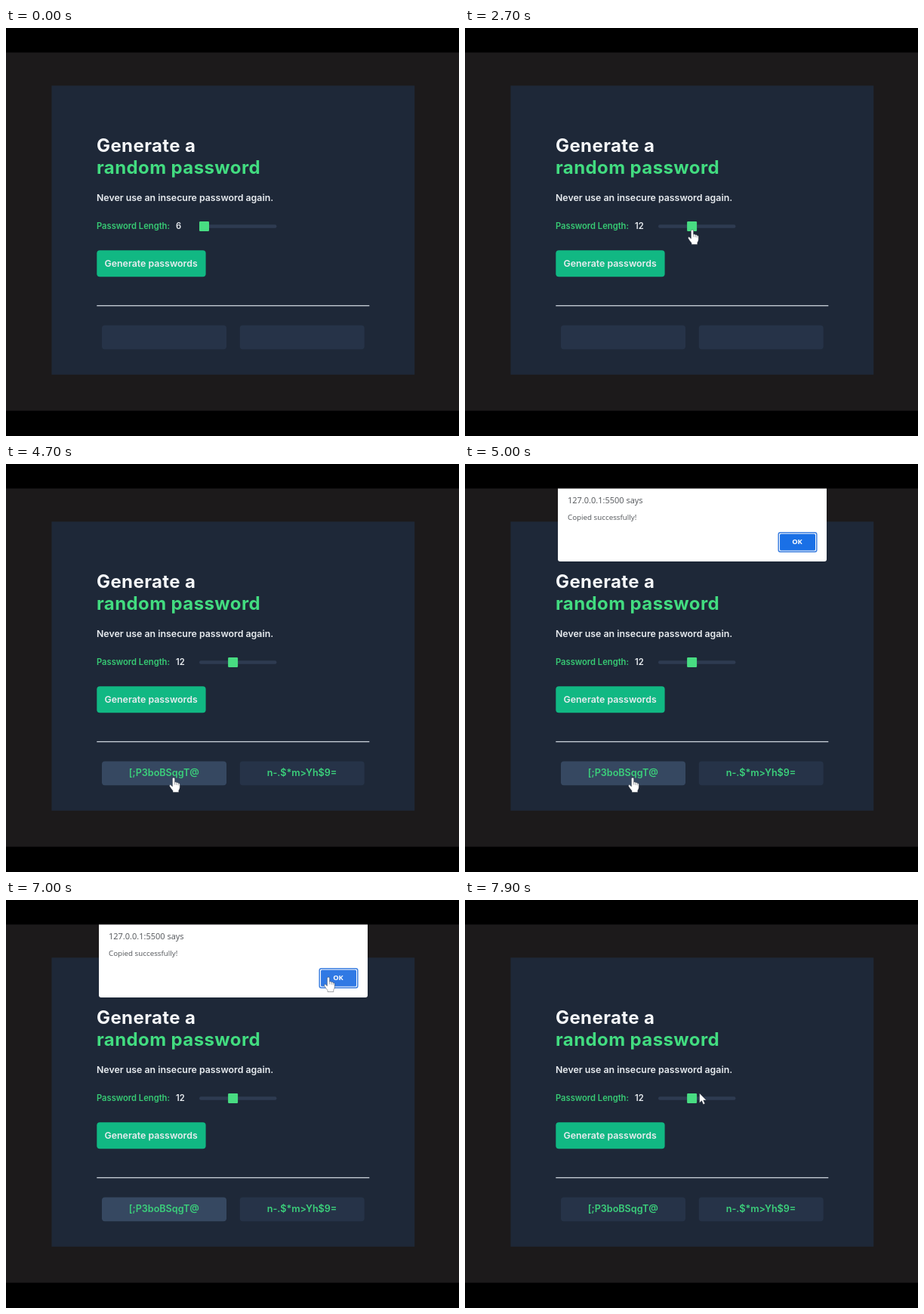
An HTML page for the animation above (8 s loop, 600 px wide and 540 px high).

```html
<!DOCTYPE html>
<html lang="en">
<head>
<meta charset="utf-8">
<title>Password generator</title>
<style>
  html, body { margin: 0; width: 100%; height: 100%; overflow: hidden; background: #000; }
  svg { display: block; width: 600px; height: 540px; font: 600 12.35px Inter, sans-serif; fill: #e8ecf0; }
  .title { font-size: 24px; font-weight: 700; letter-spacing: .4px; fill: #f6f8fa; }
  .small { font-size: 11.2px; }
  .title.accent { fill: #42dc80; }
  .password { font-size: 12.6px; fill: #3bd07b; text-anchor: middle; }
  .box { fill: #263348; }
  .box.hover { fill: #364861; }
  #dialog { font: 11px "Open Sans", sans-serif; fill: #515458; }
  .cursor { fill: #fff; stroke: #17202c; stroke-width: .4; stroke-linejoin: round; }
</style>
</head>
<body>
<svg viewBox="0 0 600 540">
  <rect y="32.4" width="600" height="474.2" fill="#1c1a1b"/>
  <rect x="60.4" y="76.3" width="480.8" height="382.5" fill="#1e2838"/>

  <text class="title" x="120" y="164">Generate a</text>
  <text class="title accent" x="120" y="193">random password</text>
  <text x="120" y="229">Never use an insecure password again.</text>

  <text class="small" x="120" y="266.3" style="fill:#37cb74">Password Length:</text>
  <text class="small" id="length" x="225" y="266.3">6</text>
  <rect x="256" y="260.3" width="102.5" height="4.4" rx="2.2" fill="#2e3b51"/>
  <rect id="thumb" x="256" y="256" width="13" height="13" rx="1.2" fill="#48dc82"/>

  <rect x="120.3" y="294.2" width="144.3" height="35" rx="4" fill="#11b883"/>
  <text x="130.5" y="315.7">Generate passwords</text>

  <rect x="120.3" y="366.9" width="361" height="1.3" fill="#ccd3dc"/>
  <rect id="firstBox" class="box" x="127" y="393.5" width="165" height="31.7" rx="4"/>
  <rect class="box" x="309.7" y="393.5" width="165" height="31.7" rx="4"/>
  <g id="passwords">
    <text class="password" x="209.3" y="413">[;P3boBSqgT@</text>
    <text class="password" x="392" y="413">n-.$*m&gt;Yh$9=</text>
  </g>

  <g id="dialog">
    <path d="M123 32.4H479V126Q479 129 476 129H126Q123 129 123 126Z" fill="#fff"/>
    <text x="136" y="51.5">127.0.0.1:5500 says</text>
    <text x="136" y="73.7" font-size="9.8">Copied successfully!</text>
    <rect x="415.2" y="90.7" width="50.6" height="25.6" rx="2.5" fill="#fff" stroke="#3c7fe0" stroke-width="1.5"/>
    <rect id="ok" x="417" y="92.5" width="47" height="22" rx="1.5"/>
    <text x="440" y="106.4" font-size="9.3" font-weight="700" text-anchor="middle" fill="#fff">OK</text>
  </g>

  <path id="arrow" class="cursor" d="M0 0V12.8L2.9 10L5 14.8L7.2 13.9L5.1 9.2H9Z"/>
  <g id="hand" class="cursor">
    <path d="M-1.6 1.5Q-1.6 0 0 0Q1.6 0 1.6 1.5V6Q3.2 5.2 4 6.8Q5.7 6 6.3 7.6Q8.2 7 8.3 9V13Q8.2 15.3 6.8 17V19.5H-1V17.5Q-3.4 14.8-5.4 11.5Q-6 9.3-4 9.6L-1.6 11.8Z"/>
    <path d="M1.6 6V9.5M4 6.8V10M6.3 7.6V10.4" fill="none"/>
  </g>
</svg>
<script>
const LOOP = 8000, STEP = 100;
const get = id => document.getElementById(id);

// Pointer tip: time, x, y
const path = [
  [1900, 240, 205], [2200, 262, 266], [2300, 262, 266], [2600, 301, 267],
  [2800, 301, 267], [3200, 236, 319], [3800, 236, 319], [4400, 222, 415],
  [5300, 222, 415], [6200, 496, 135], [6300, 496, 135], [6800, 427, 102],
  [7100, 427, 102], [7500, 311, 257], [7700, 310.6, 255.7]
];
const handTimes = [[2200, 2900], [3100, 3900], [4300, 7200]];

const within = (t, from, to) => t >= from && t < to;
const smooth = p => p * p * (3 - 2 * p);
const show = (id, visible) => get(id).setAttribute("display", visible ? "inline" : "none");

function pointerAt(t) {
  const next = path.findIndex(key => key[0] > t);
  if (next < 0) return path[path.length - 1].slice(1);
  if (next === 0) return path[0].slice(1);
  const [t0, x0, y0] = path[next - 1], [t1, x1, y1] = path[next];
  const p = smooth((t - t0) / (t1 - t0));
  return [x0 + (x1 - x0) * p, y0 + (y1 - y0) * p];
}

function draw(t) {
  const drag = smooth(Math.min(1, Math.max(0, (t - 2300) / 300)));
  const length = 6 + Math.round(6 * drag);
  get("length").textContent = length;
  get("thumb").setAttribute("x", 256 + (length - 6) * 6.35);

  show("passwords", t >= 3300);
  show("dialog", within(t, 4900, 7200));
  get("firstBox").classList.toggle("hover", within(t, 4400, 7200));
  get("ok").setAttribute("fill", within(t, 6700, 7200) ? "#3079e4" : "#1a70e6");

  const isHand = handTimes.some(([from, to]) => within(t, from, to));
  const [x, y] = pointerAt(t);
  for (const id of ["arrow", "hand"]) {
    get(id).setAttribute("transform", `translate(${x} ${y})`);
    show(id, t >= 1900 && isHand === (id === "hand"));
  }
}

function tick() {
  draw(Math.floor(performance.now() % LOOP / STEP) * STEP);
  requestAnimationFrame(tick);
}
tick();
</script>
</body>
</html>
```
